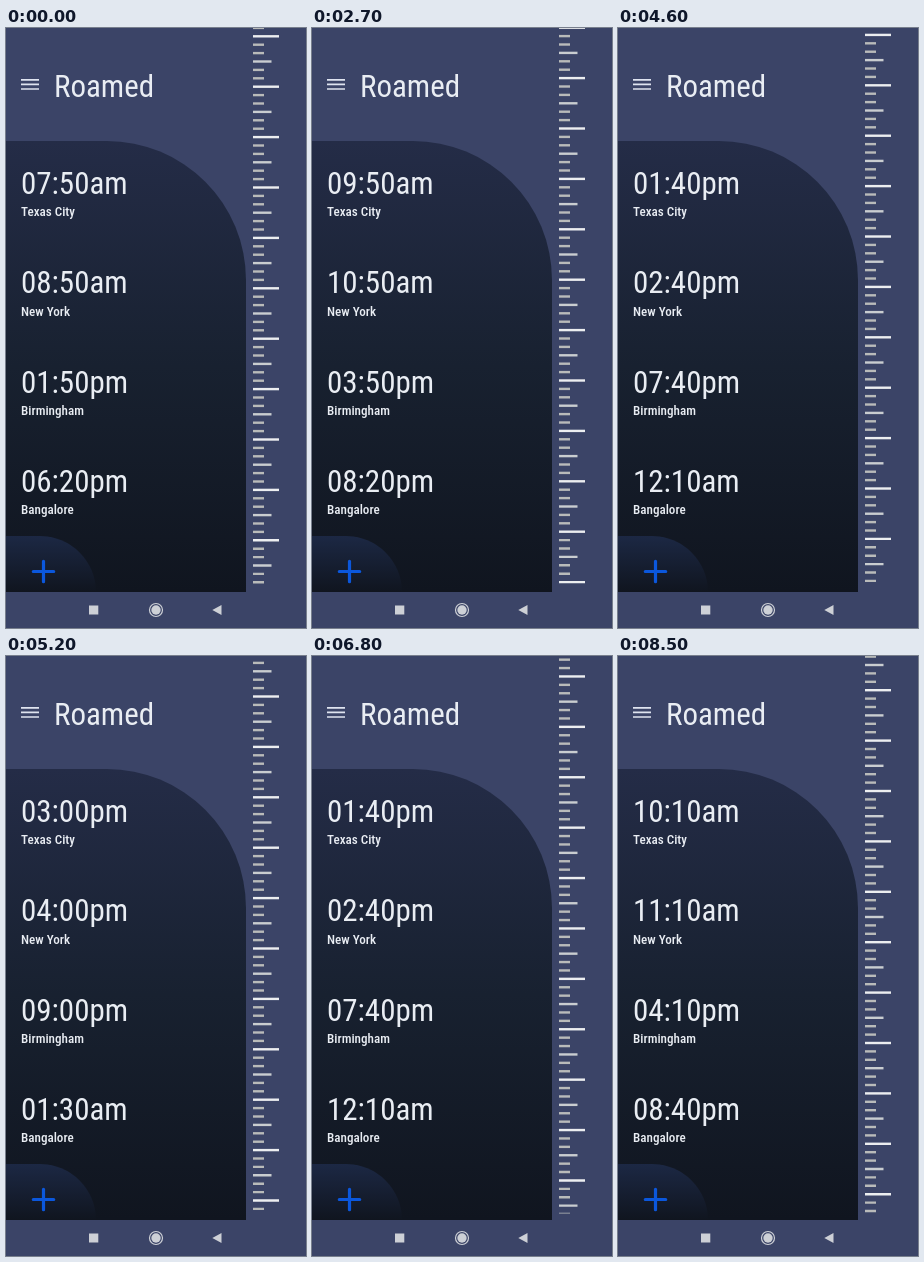
An HTML page for the animation above (9.1 s loop, 300 px wide and 600 px high).

```html
<!DOCTYPE html>
<html lang="en">
<head>
<meta charset="utf-8">
<title>World clock</title>
<style>
  html, body { margin: 0; width: 100%; height: 100%; overflow: hidden; }
  svg { display: block; width: 100%; height: 100%; background: #3b4467; }
  text { font-family: "Roboto Condensed", Roboto, sans-serif; font-stretch: 75%; fill: #e9edf3; }
  .title, .time { font-size: 31px; }
  .city { font-size: 13.1px; font-weight: 500; }
</style>
</head>
<body>
<svg viewBox="0 0 300 600">
  <defs>
    <linearGradient id="panel" x2="0" y2="1">
      <stop stop-color="#242c47"/>
      <stop offset=".5" stop-color="#182130"/>
      <stop offset="1" stop-color="#10151f"/>
    </linearGradient>
    <linearGradient id="corner" x2="0" y2="1">
      <stop stop-color="#1c2844"/>
      <stop offset="1" stop-color="#10151f"/>
    </linearGradient>
    <clipPath id="rulerArea"><path d="M240 0H300V557.5H240Z"/></clipPath>
  </defs>

  <path d="M15 51.8H33M15 56.4H33M15 61H33" stroke="#dfe4f0" stroke-width="1.7"/>
  <text class="title" x="48" y="69">Roamed</text>

  <path d="M0 113H101A139 139 0 0 1 240 252V564H0Z" fill="url(#panel)"/>
  <g id="clocks"></g>
  <path d="M0 508H34A56 56 0 0 1 90 564H0Z" fill="url(#corner)"/>
  <path d="M27.3 543.5H47.7M37.5 533.3V553.7" stroke="#0b57dc" stroke-width="3.2" stroke-linecap="round"/>

  <g clip-path="url(#rulerArea)"><g id="ruler"></g></g>

  <g fill="#cdd0d6">
    <path d="M83 577.5H92.3V586.5H83ZM206.3 582L215.5 577V587Z"/>
    <circle cx="150" cy="582" r="4.7"/>
    <circle cx="150" cy="582" r="6.5" fill="none" stroke="#cdd0d6" stroke-width="1.2"/>
  </g>
</svg>
<script>
const LOOP = 9100, STEP = 100;
const HOUR = 50.4, TICK = HOUR / 6;
const START_MINUTES = 7 * 60 + 50, START_Y = 8.3;
const CITIES = [["Texas City", 0], ["New York", 60], ["Birmingham", 360], ["Bangalore", 630]];

// Ruler scroll: [ms, px]
const SCROLL = [[1400, 0], [2700, 109.4], [3900, 220.9], [5200, 371], [5650, 386],
                [6200, 367.1], [7400, 210.5], [8400, 125.3]];

const clamp = (v, lo, hi) => Math.min(hi, Math.max(lo, v));

function add(parent, tag, attrs, text = "") {
  const node = document.createElementNS("http://www.w3.org/2000/svg", tag);
  for (const key in attrs) node.setAttribute(key, attrs[key]);
  node.textContent = text;
  return parent.appendChild(node);
}

// Slope at a scroll point; flat at both ends and at the turning point.
function slope(i) {
  const [before, here, after] = [SCROLL[i - 1], SCROLL[i], SCROLL[i + 1]];
  if (!before || !after || (here[1] - before[1]) * (after[1] - here[1]) <= 0) return 0;
  return (after[1] - before[1]) / (after[0] - before[0]);
}

function scrollAt(ms) {
  const t = clamp(ms, SCROLL[0][0], SCROLL.at(-1)[0]);
  const i = Math.max(1, SCROLL.findIndex(p => p[0] >= t));
  const [t0, y0] = SCROLL[i - 1], [t1, y1] = SCROLL[i];
  const d = t1 - t0, u = (t - t0) / d, v = 1 - u;
  return v * v * (1 + 2 * u) * y0 + u * u * (3 - 2 * u) * y1
       + d * u * v * (v * slope(i - 1) - u * slope(i));
}

function formatTime(minutes) {
  const hours = Math.floor(minutes / 60) % 24;
  const pad = n => String(n).padStart(2, "0");
  return pad(hours % 12 || 12) + ":" + pad(minutes % 60) + (hours < 12 ? "am" : "pm");
}

const ruler = document.getElementById("ruler");
const clocks = document.getElementById("clocks");

const readouts = CITIES.map(([city, offset], i) => {
  const y = 166 + i * 99.4;
  const node = add(clocks, "text", { class: "time", x: 15, y });
  add(clocks, "text", { class: "city", x: 15, y: y + 22.2 }, city);
  return { node, offset };
});

for (let i = -6; i < 78; i++) {
  const [length, stroke] =
    i % 6 === 0 ? [26, "#eceef0"] :
    i % 3 === 0 ? [18.5, "#c9cdd0"] : [11, "#b9bbba"];
  add(ruler, "path", { d: `M247 ${i * TICK}h${length}`, stroke, "stroke-width": 2.4 });
}

function draw(now) {
  const t = Math.floor(now % LOOP / STEP) * STEP;
  const phase = (START_Y - scrollAt(t)) % HOUR;
  ruler.setAttribute("transform", `translate(0 ${phase})`);

  // The readouts trail the ruler slightly.
  const ticks = Math.floor(scrollAt(t - 50) / TICK);
  for (const { node, offset } of readouts)
    node.textContent = formatTime(START_MINUTES + offset + ticks * 10);

  requestAnimationFrame(() => draw(performance.now()));
}
draw(performance.now());
</script>
</body>
</html>
```
